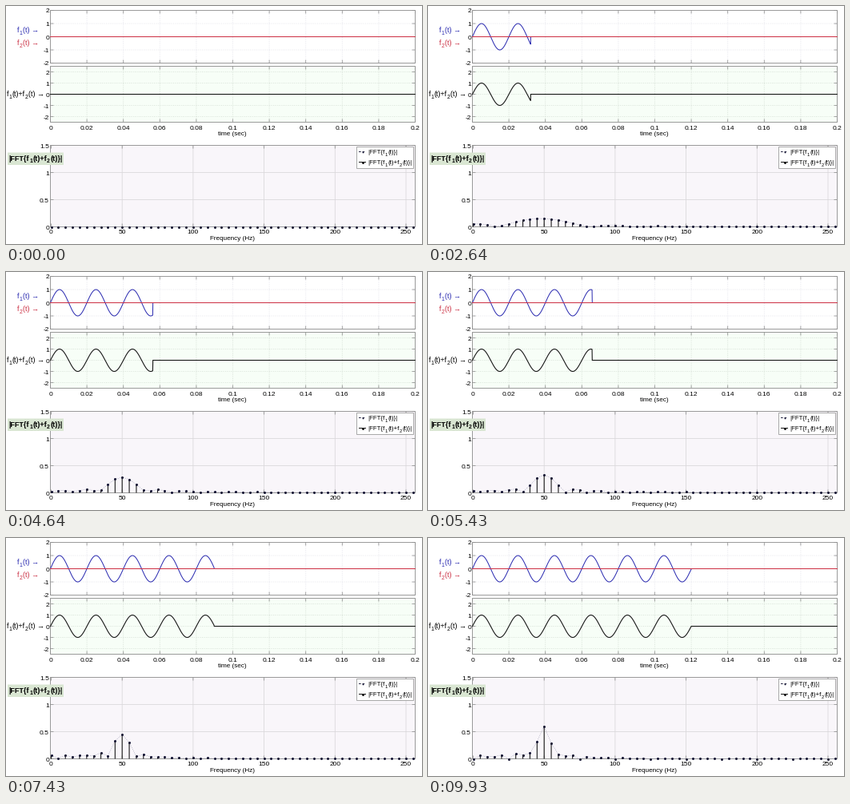
Recreate the animation shown at these times as a matplotlib script. Size 520 by 298 pixels, loop 10 s.

```python
import numpy as np
import matplotlib.pyplot as plt
from matplotlib.animation import FuncAnimation
from matplotlib.collections import LineCollection
from matplotlib.patches import Rectangle

W, H, DPI = 520, 298, 100
PX = 72 / DPI                      # points per pixel
FRAMES, INTERVAL = 200, 50
STEPS = 140                        # signal updates in one loop
SPAN, T_END, TONE = 0.2, 0.12, 50  # seconds, seconds, Hz

plt.rcParams["font.family"] = "Liberation Sans"
plt.rcParams["path.snap"] = False  # half-pixel coordinates are already crisp

fig = plt.figure(figsize=(W / DPI, H / DPI), dpi=DPI, facecolor="white")
ax = fig.add_axes([0, 0, 1, 1])
ax.set_xlim(0, W)
ax.set_ylim(H, 0)
ax.axis("off")

LEFT, RIGHT = 55.5, 511.5
BLUE, RED, NAVY, INK = "#2a2ab0", "#cc3044", "#101030", "#181818"
FRAME = "#909090"


def time_x(t):
    return LEFT + t / SPAN * (RIGHT - LEFT)


def freq_x(f):
    return 56.5 + 1.774 * f


def wave_y(v):
    return 38.5 - 16.5 * v


def sum_y(v):
    return 110.5 - 14 * v


def fft_y(v):
    return 276.5 - 68 * v


def label(x, y, s, size=8.4, ha="center", **kw):
    return ax.text(x, y, s, fontsize=size * PX, ha=ha, va="baseline",
                   zorder=6, **kw)


def formula(x, y, s, size, ha="left", **kw):
    """Text in which _1_ and _2_ are set as lowered subscripts."""
    runs, pos = [], x
    for n, part in enumerate(s.split("_")):
        sub = n % 2
        run = label(pos, y + 2.8 * sub, part, size * (0.75 if sub else 1),
                    "left", **kw)
        pos += run.get_window_extent().width + 0.2
        runs.append(run)
    shift = {"left": 0, "center": 0.5, "right": 1}[ha] * (pos - x)
    for run in runs:
        run.set_x(run.get_position()[0] - shift)


def segments(segs, color, width, style="solid", zorder=1.5):
    lines = LineCollection(segs, colors=color, linewidths=width * PX,
                           linestyles=style, zorder=zorder)
    ax.add_collection(lines, autolim=False)
    return lines


def curve(color, width, zorder, **kw):
    return ax.plot([], [], color=color, lw=width * PX, zorder=zorder, **kw)[0]


def panel(top, bottom, face, xs, ys, grid, style):
    """Background, grid, frame and inward ticks of one plot."""
    box = (LEFT, top), RIGHT - LEFT, bottom - top
    ax.add_patch(Rectangle(*box, fc=face, ec="none", zorder=1))
    inner_x = [x for x in xs if LEFT + 3 < x < RIGHT - 3]
    inner_y = [y for y in ys if top + 3 < y < bottom - 3]
    segments([[(x, top), (x, bottom)] for x in inner_x]
             + [[(LEFT, y), (RIGHT, y)] for y in inner_y], grid, 0.8, style)
    ticks = []
    for x in xs:
        ticks += [[(x, top), (x, top + 4)], [(x, bottom), (x, bottom - 4)]]
    for y in ys:
        ticks += [[(LEFT, y), (LEFT + 4, y)], [(RIGHT, y), (RIGHT - 4, y)]]
    segments(ticks, FRAME, 0.8)
    ax.add_patch(Rectangle(*box, fc="none", ec=FRAME, lw=0.9 * PX, zorder=2))


time_ticks = np.arange(11) * 0.02
freq_ticks = np.arange(0, 251, 50)
levels = np.arange(-2, 3)
mags = np.arange(4) * 0.5
dots = (0, (1, 2))

panel(5.5, 71.5, "white", time_x(time_ticks), wave_y(levels), "#dcdce6", dots)
panel(75.5, 145.5, "#f7fef7", time_x(time_ticks), sum_y(levels),
      "#cbd6cb", dots)
panel(174.5, 276.5, "#f9f6fa", freq_x(freq_ticks), fft_y(mags),
      "#d9d7da", "solid")

for v in levels:
    label(54, wave_y(v) + 3, str(v), ha="right")
    label(54, sum_y(v) + 3, str(v), ha="right")
for v in mags:
    label(54, fft_y(v) + 3, f"{v:g}", ha="right")
for t in time_ticks:
    label(time_x(t), 155, f"{t:.2g}")
for f in freq_ticks:
    label(freq_x(f), 285, str(f))
label(283.3, 162, "time (sec)", 8.2)
label(283.3, 293, "Frequency (Hz)", 8.2)

F1, F2 = "f_1_(t)", "f_2_(t)"
formula(41, 33, F1 + " →", 9, "right", color=BLUE)
formula(41, 49, F2 + " →", 9, "right", color=RED)
formula(48, 113, F1 + "+" + F2 + " →", 9, "right")
ax.add_patch(Rectangle((2, 183.5), 70, 15.5, fc="#d9e6d2", ec="none",
                       zorder=5))
formula(37, 193.5, "|FFT{" + F1 + "+" + F2 + "}|", 9, "center", weight="bold")

# legend
ax.add_patch(Rectangle((438.5, 176.5), 71, 27, fc="white", ec="#a0a0a0",
                       lw=0.9 * PX, zorder=5))
segments([[(441, 182.5), (449, 182.5)]], NAVY, 0.9, (0, (3, 2)), 6)
segments([[(441, 195.5), (450, 195.5)]], INK, 1, zorder=6)
ax.plot([446], [182.5], "o", ms=1.8 * PX, mec="none", mfc=NAVY, zorder=7)
ax.plot([446], [195.5], "o", ms=3 * PX, mec="none", mfc=INK, zorder=7)
formula(452, 185, "|FFT{" + F1 + "}|", 7.9)
formula(452, 198, "|FFT{" + F1 + "+" + F2 + "}|", 7.9)

# moving parts
N = 2000
time = np.arange(N) * SPAN / N
tone = np.sin(2 * np.pi * TONE * time)
freqs = np.arange(0, 256, 5)
kernel = np.exp(-2j * np.pi * np.outer(freqs, time)) * 2 / N
xt, xf = time_x(time), freq_x(freqs)

wave = curve(BLUE, 1, 3)
ax.plot([LEFT, RIGHT], [wave_y(0)] * 2, color=RED, lw=PX, zorder=3.1)
total = curve(INK, 1.1, 3)
envelope = curve("#a4a4ba", 0.6, 3, ls=(0, (2, 2)))
stems = segments([], INK, 1.1, zorder=3.2)
heads = curve(NAVY, 0, 3.3, ls="none", marker="o", ms=3 * PX, mec="none")


def update(i):
    step = int((i + 0.98) * STEPS / FRAMES)
    cut = T_END * step / (STEPS - 1)
    signal = np.where(time < cut, tone, 0)
    top = fft_y(np.abs(kernel @ signal))
    wave.set_data(xt, wave_y(signal))
    total.set_data(xt, sum_y(signal))
    envelope.set_data(xf, top)
    heads.set_data(xf, top)
    stems.set_segments([[(x, fft_y(0)), (x, y)] for x, y in zip(xf, top)])
    return wave, total, envelope, heads, stems


anim = FuncAnimation(fig, update, frames=FRAMES, interval=INTERVAL,
                     repeat=True, repeat_delay=0, blit=False)
plt.show()
```
